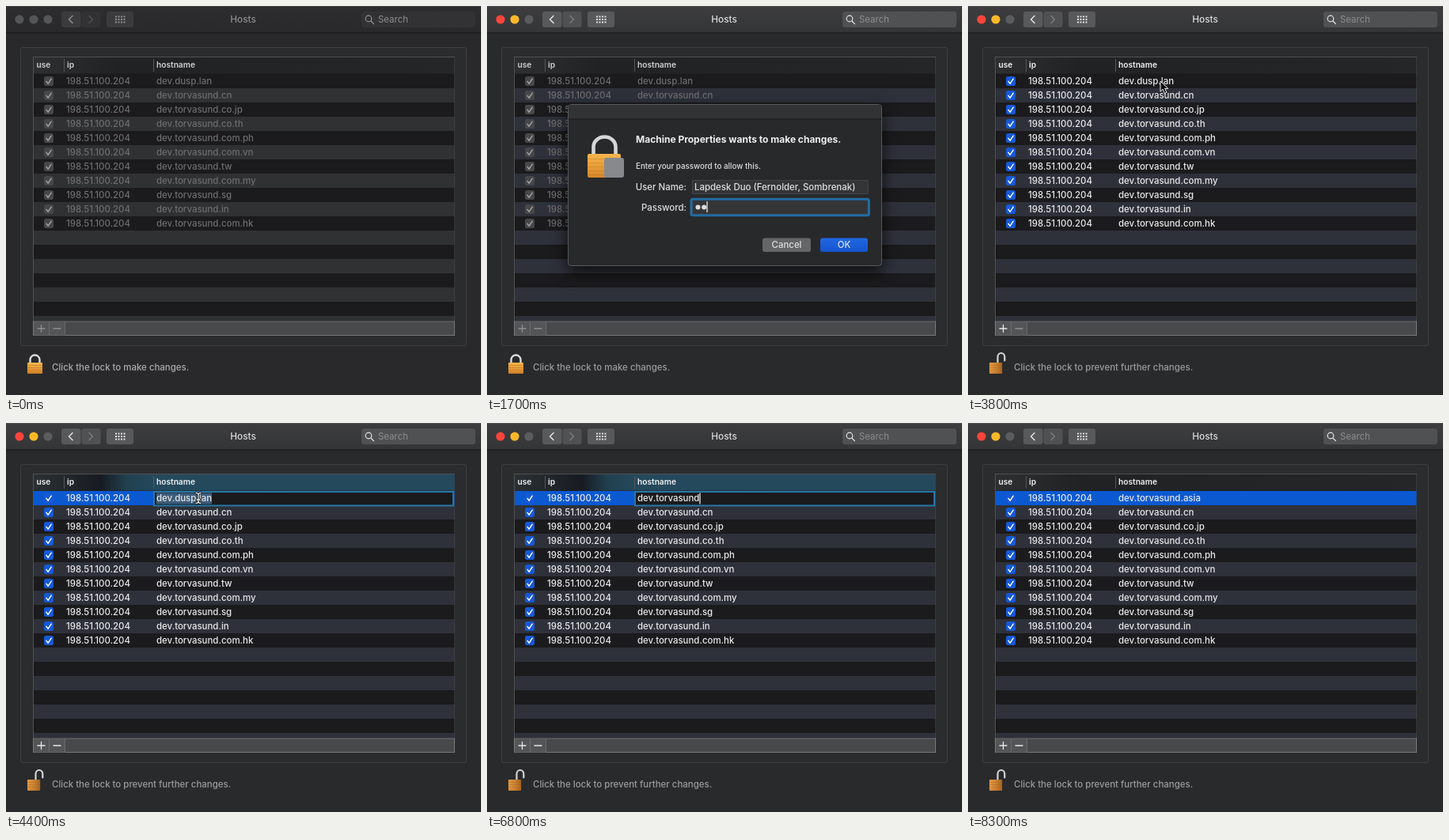
Write an HTML page that moves like this. It is 600 by 492 pixels and loops after 8600 ms.

```html
<!DOCTYPE html>
<html lang="en">
<head>
<meta charset="utf-8">
<title>Hosts</title>
<style>
html, body { margin: 0; width: 100%; height: 100%; overflow: hidden; background: #29292b; }
svg { display: block; width: 600px; height: 492px;
  --body: #292a2c; --bar1: #3d3d3f; --bar2: #343537; --btn: #58595b; --btn2: #505153;
  --glyph: #e4e4e5; --dim: #7c7d7f; --title: #dcdcdd; --alt: #2e313a; --cell: #6d6d6f;
  --head: #d0d0d1; --box: #474749; --tick: #a2a2a3; --label: #9b9b9d;
  --plus: #8e8e90; --minus: #8e8e90; --latch: url(#brass); }
svg.idle { --body: #29292b; --bar1: #2d2d2f; --bar2: #29292b; --btn: #3b3b3d; --btn2: #323234;
  --glyph: #929293; --dim: #505052; --title: #8d8d8e; --alt: #303133; --label: #ababac; }
svg.open { --cell: #e9e9ea; --head: #f0f0f1; --box: #1659d7; --tick: #fff; --plus: #e8e8e9;
  --latch: url(#shade); }
svg.picked { --minus: #e8e8e9; }
text { font: 500 11.45px Inter, sans-serif; fill: #dededf; white-space: pre; }
.cell { fill: var(--cell); }
.head { fill: var(--head); font-size: 10.2px; font-weight: 600; }
.line { fill: none; stroke-linecap: round; stroke-linejoin: round; }
#dialog { filter: drop-shadow(0 8px 10px #000b); }
.field { fill: #343537; stroke: #434446; }
.push { fill: #656668; }
.busy .field { fill: #2c2d2f; stroke: #333436; }
.busy .push, .busy #ok { fill: #434446; }
.busy .fade { fill: #747476; }
</style>
</head>
<body>
<svg id="stage" viewBox="0 0 600 492" xmlns="http://www.w3.org/2000/svg"></svg>
<script>
const LOOP = 8600, TICK = 100;
const ROW = 18, TOP = 86;
const ADDRESS = '198.51.100.204';
const OLD_HOST = 'dev.dusp.lan', NEW_HOST = 'dev.torvasund.asia';
const ENDINGS = ['cn', 'co.jp', 'co.th', 'com.ph', 'com.vn', 'tw', 'com.my', 'sg', 'in', 'com.hk'];
const HOSTS = [OLD_HOST, ...ENDINGS.map(e => 'dev.torvasund.' + e)];

const AT = {
  active: 100, dialog: 300, typePass: 1600, aim: 2400, submit: 2900, closed: 3100,
  unlocked: 3200, lockUp: 3300, pick: 4100, edit: 4200, drag: 4900, typeHost: 5800, commit: 7600
};
const PASS_KEYS = [1600, 1700, 1800, 1900, 2000, 2200];
const HOST_KEYS = [...Array(9).keys()].map(i => 5800 + i * 100)
  .concat([7000, 7100, 7200, 7300, 7400]);

// Pointer path: time, x, y
const PATH = [
  [100, 40.5, 454], [2400, 40.5, 454], [2800, 433, 298], [3300, 433, 298],
  [3800, 243, 95], [4400, 243, 95], [4800, 211, 98], [4900, 211, 98], [5200, 325, 105]
];

const rect = (x, y, w, h, fill, more = '') =>
  `<rect x="${x}" y="${y}" width="${w}" height="${h}" fill="${fill}" ${more}/>`;
const text = (x, y, s, more = '') => `<text x="${x}" y="${y}" ${more}>${s}</text>`;
const line = (d, stroke, width = 1, more = '') =>
  `<path class="line" d="${d}" stroke="${stroke}" stroke-width="${width}" ${more}/>`;
const group = (id, ...parts) => `<g id="${id}">${parts.join('')}</g>`;
const gradient = (id, stops, flat = false) =>
  `<linearGradient id="${id}" x2="${+flat}" y2="${+!flat}">` +
  stops.map(([o, c]) => `<stop offset="${o}" style="stop-color:${c}"/>`).join('') + '</linearGradient>';

function titleBar() {
  let dots = '';
  for (let i = 0; i < 12; i++) {
    dots += rect(138 + i % 4 * 3.5, 12.5 + (i / 4 | 0) * 3.5, 2, 2, 'var(--glyph)');
  }
  const lights = ['#fb453c', '#f8b82a', '#5b5c5e']
    .map((c, i) => `<circle class="light" cx="${17 + i * 18}" cy="17" r="5.6" data-on="${c}"/>`);
  return rect(0, 0, 600, 34, 'url(#bar)') + rect(0, 0, 600, 1, '#56575980') +
    rect(0, 33.5, 600, 1, '#161618') + lights.join('') +
    rect(70, 7, 24.5, 20, 'var(--btn)', 'rx="3"') + rect(95.5, 7, 24, 20, 'var(--btn2)', 'rx="3"') +
    rect(127, 7, 34, 20, 'var(--btn)', 'rx="3"') + dots +
    line('M84 12.5l-4.5 4.5l4.5 4.5', 'var(--glyph)', 1.5) +
    line('M105 12.5l4.5 4.5l-4.5 4.5', 'var(--dim)', 1.5) +
    text(299.5, 21.2, 'Hosts', 'text-anchor="middle" style="font-size:11.8px;fill:var(--title)"') +
    rect(449, 7, 144, 20, 'var(--btn2)', 'rx="3.5"') +
    `<circle class="line" cx="458" cy="16" r="3.8" stroke="var(--glyph)" stroke-width="1.2"/>` +
    line('M461 19l3.4 3.6', 'var(--glyph)', 1.3) +
    text(470, 21, 'Search', 'style="fill:#8c8d8f;font-weight:400"');
}

function table() {
  let out = rect(18.5, 52.5, 563, 377, '#2b2c2e', 'rx="2.5" stroke="#3e3f41"') +
    rect(34.5, 64.5, 532, 352, '#1b1b1d', 'stroke="#505153"') +
    rect(35, 65, 531.5, 20.5, 'url(#header)') +
    rect(35, 65, 531.5, 20.5, 'url(#glow)', 'id="tint"') +
    rect(73, 67, 1, 16, '#55575a') + rect(186, 67, 1, 16, '#55575a') +
    text(38.5, 78, 'use', 'class="head"') + text(77, 78, 'ip', 'class="head"') +
    text(190, 78, 'hostname', 'class="head"');
  for (let i = 0; i < 18; i++) {
    const y = TOP + i * ROW;
    out += rect(35, y, 531.5, Math.min(ROW, 398 - y), i % 2 ? 'var(--alt)' : '#1b1a1c');
  }
  out += rect(35, TOP, 531.5, ROW, '#0b59d1', 'id="selected"') +
    group('editor',
      rect(187, TOP + 1, 378, 17.5, '#1b1b1d', 'stroke="#2877a8" stroke-width="2"'),
      rect(211, 88.5, 48, 14, '#3d5c7a', 'id="marked"'));
  HOSTS.forEach((host, i) => {
    const y = TOP + i * ROW;
    out += rect(48, y + 3, 12, 12, 'var(--box)', 'rx="2.8"') +
      line(`M51 ${y + 9.4}l2.2 2.8l4 -6`, 'var(--tick)', 1.5) +
      text(76, y + 13, ADDRESS, 'class="cell"') +
      text(190, y + 13, host, `class="cell" id="host${i}"`);
  });
  return out + rect(262, 88.5, 1.2, 14, '#f4f4f5', 'id="caret"') +
    rect(34.5, 399, 532, 17.5, '#48494b', 'stroke="#77787a"') +
    rect(35, 400, 19, 16.5, '#545557') + rect(55, 400, 19, 16.5, '#545557') +
    rect(54, 399, 1, 18, '#6a6b6d') + rect(74, 399, 1, 18, '#6a6b6d') +
    line('M40 408h9M44.5 403.5v9', 'var(--plus)', 1.3) + line('M60 408h9', 'var(--minus)', 1.3);
}

function padlock() {
  let ribs = '';
  for (let y = 454; y < 464; y += 3) ribs += rect(27, y, 19, .8, '#a9601d80');
  return line('M30.5 452v-4.5a6 6 0 0 1 12 0v4.5', '#dcdcdd', 2.4, 'id="shut"') +
    line('M37 452v-2a4.6 5 0 0 1 9 -4v3', '#d4d4d5', 2.2, 'id="ajar"') +
    line('M37.5 452v-8a4.4 5 0 0 1 8.8 0v4.5', '#d4d4d5', 2.2, 'id="loose"') +
    group('latch', rect(27, 451, 19, 14, 'var(--latch)', 'rx="1"'), ribs) +
    text(58, 460.5, '', 'id="label" style="fill:var(--label)"');
}

function dialog() {
  let ribs = '', dots = '';
  for (let y = 193; y < 215; y += 5) ribs += rect(127, y, 42, 1, '#b8702460');
  for (let i = 0; i < 6; i++) {
    dots += `<circle class="dot fade" cx="${266.5 + i * 7.7}" cy="254.5" r="3" fill="#dededf"/>`;
  }
  return group('dialog',
    rect(102.5, 124.5, 396, 204, '#28292b', 'rx="4" stroke="#58595b"'),
    rect(103, 125, 395, 18, '#323335', 'rx="3.5"'), rect(103, 142.5, 395, 1, '#18181a'),
    line('M134.5 190v-12a14 12.5 0 0 1 28 0v12', '#d5d6d8', 4.6),
    rect(127, 187, 42, 30, 'url(#brass)', 'rx="2"'), ribs,
    rect(148, 192, 25, 25, '#87898d', 'rx="3"'),
    text(188, 173, 'Machine Properties wants to make changes.', 'style="font-size:12px;font-weight:700;fill:#efeff0"'),
    text(188, 205.5, 'Enter your password to allow this.', 'style="font-size:9.8px"'),
    text(252, 232.5, 'User Name:', 'text-anchor="end"'),
    text(252, 258.5, 'Password:', 'text-anchor="end"'),
    rect(259.5, 220.5, 222, 17, '', 'class="field"'),
    text(262, 232.5, 'Lapdesk Duo (Fernolder, Sombrenak)', 'class="fade"'),
    rect(259.5, 245.5, 222, 18, '', 'class="field"'),
    rect(258, 244.3, 224.4, 20.4, 'none', 'id="ring" rx="2" stroke="#206ca0" stroke-width="3"'),
    dots, rect(262, 247, 1.2, 14, '#f4f4f5', 'id="passCaret"'),
    rect(348, 293.5, 61, 17.5, '', 'class="push" rx="3"'),
    rect(421, 293.5, 60, 17.5, 'url(#blue)', 'id="ok" rx="3"'),
    text(378.5, 306, 'Cancel', 'class="fade" text-anchor="middle"'),
    text(451, 306, 'OK', 'class="fade" text-anchor="middle"'));
}

const pointers =
  group('arrow', '<path d="M0 0v13.2l3.1-2.9l2.3 5.2l2.5-1.1l-2.3-5h4.2z" fill="#0b0b0c" stroke="#f2f2f3"/>') +
  group('beam', ...[['#111', 3], ['#eee', 1.3]].map(([c, w]) =>
    line('M-3 -6.5q3 0 3 2.5v8q0 2.5 -3 2.5M3 -6.5q-3 0 -3 2.5v8q0 2.5 3 2.5M-2 2h4', c, w)));

const stage = document.getElementById('stage');
stage.innerHTML = '<defs>' +
  gradient('bar', [[0, 'var(--bar1)'], [1, 'var(--bar2)']]) +
  gradient('header', [[0, '#2d2f31'], [.07, '#292b2d'], [.2, '#202224'], [1, '#242628']], true) +
  gradient('glow', [[0, '#2b3034'], [.08, '#22272c'], [.16, '#171b21'], [.22, '#21404f'], [.29, '#24495d'], [1, '#24495d']], true) +
  gradient('brass', [[0, '#f4b54c'], [.5, '#e8a039'], [1, '#d48629']]) +
  gradient('shade', [[0, '#e39c45'], [.5, '#cd8334'], [1, '#a5631f']], true) +
  gradient('blue', [[0, '#2168e2'], [1, '#1455cf']]) + '</defs>' +
  rect(0, 0, 600, 492, 'var(--body)') + titleBar() + table() + padlock() + dialog() + pointers;

const el = id => document.getElementById(id);
const show = (node, on) => { node.style.display = on ? '' : 'none'; };
const count = (keys, t) => keys.filter(k => k <= t).length;
const lights = [...document.querySelectorAll('.light')];
const dots = [...document.querySelectorAll('.dot')];
const within = (t, a, b) => t >= a && t < b;

function pointAt(t) {
  const i = PATH.findIndex(p => p[0] > t);
  if (i < 0) return PATH[PATH.length - 1].slice(1);
  if (i === 0) return PATH[0].slice(1);
  const [t0, x0, y0] = PATH[i - 1], [t1, x1, y1] = PATH[i];
  const u = (t - t0) / (t1 - t0), k = u * u * (3 - 2 * u);
  return [x0 + (x1 - x0) * k, y0 + (y1 - y0) * k];
}

function drawDialog(t) {
  const busy = t >= AT.submit, typed = count(PASS_KEYS, t);
  show(el('dialog'), within(t, AT.dialog, AT.closed));
  show(el('ring'), !busy);
  dots.forEach((d, i) => show(d, i < typed));
  show(el('passCaret'), !busy && (typed > 0 || (t - AT.dialog) % 1000 < 500));
  el('passCaret').setAttribute('x', 262 + typed * 7.7);
}

function drawEditor(t) {
  const editing = within(t, AT.edit, AT.commit), typing = t >= AT.typeHost;
  const host = el('host0');
  host.textContent = typing ? NEW_HOST.slice(0, 4 + count(HOST_KEYS, t)) : OLD_HOST;
  show(el('selected'), t >= AT.pick);
  show(el('tint'), editing);
  show(el('editor'), editing);
  show(el('marked'), editing && !typing);
  show(el('caret'), editing && typing);
  if (!editing) return;
  const end = 190 + host.getComputedTextLength();
  if (typing) return el('caret').setAttribute('x', end);
  const from = t < AT.drag ? 190 : 190 + host.getSubStringLength(0, 4);
  const to = t < AT.drag ? end : Math.min(end, Math.max(from, pointAt(t)[0]));
  el('marked').setAttribute('x', from);
  el('marked').setAttribute('width', to - from);
}

function drawPointer(t) {
  const [x, y] = pointAt(t), beam = t >= AT.edit;
  const seen = within(t, AT.active, AT.typePass) || within(t, AT.aim, AT.typeHost);
  show(el('arrow'), seen && !beam);
  show(el('beam'), seen && beam);
  el(beam ? 'beam' : 'arrow').setAttribute('transform', `translate(${x} ${y})`);
}

function draw(t) {
  const idle = t < AT.active, open = t >= AT.unlocked, up = t >= AT.lockUp;
  stage.classList.toggle('idle', idle);
  stage.classList.toggle('busy', t >= AT.submit);
  stage.classList.toggle('open', open);
  stage.classList.toggle('picked', t >= AT.pick);
  lights.forEach(l => l.setAttribute('fill', idle ? '#545557' : l.dataset.on));
  show(el('shut'), !open);
  show(el('ajar'), open && !up);
  show(el('loose'), up);
  el('latch').setAttribute('transform', open ? 'translate(4.05 0) scale(.85 1)' : '');
  el('label').textContent = open ? 'Click the lock to prevent further changes.' : 'Click the lock to make changes.';
  drawDialog(t);
  drawEditor(t);
  drawPointer(t);
}

let start, last = -1;
function frame(now) {
  start ??= now;
  const t = Math.floor((now - start) % LOOP / TICK) * TICK;
  if (t !== last) draw(last = t);
  requestAnimationFrame(frame);
}
draw(0);
requestAnimationFrame(frame);
</script>
</body>
</html>
```
